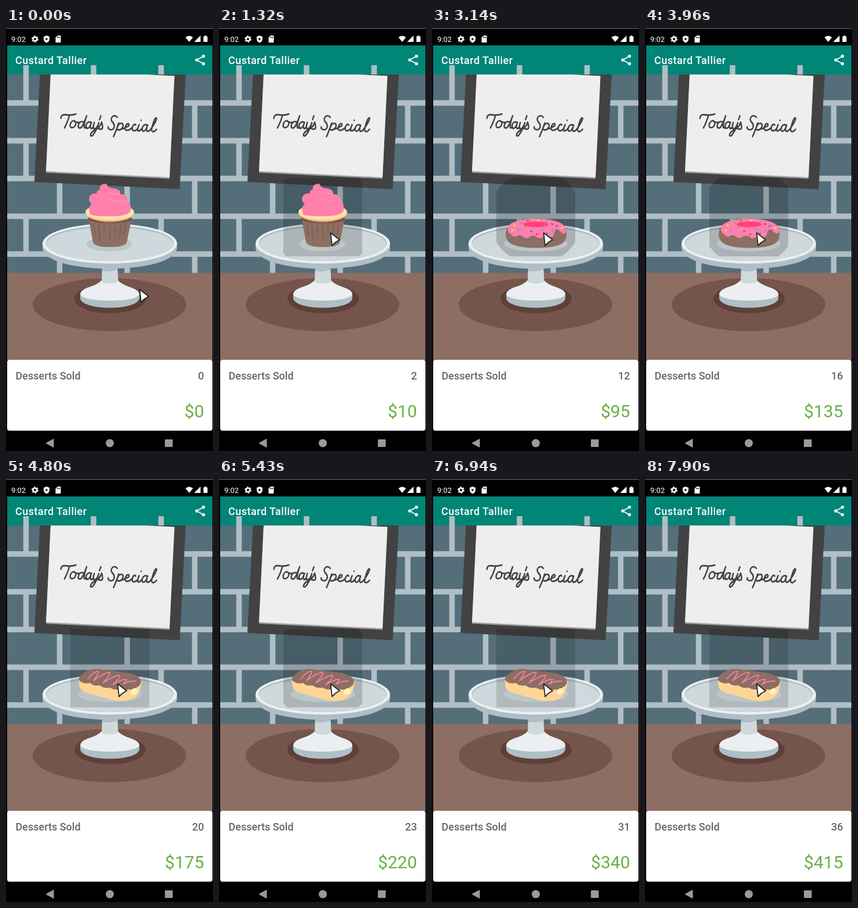
Recreate the animation shown at these times as an HTML page. Size 357 by 728 pixels, loop 8000 ms.

```html
<!DOCTYPE html>
<html lang="en">
<head>
<meta charset="utf-8">
<title>Dessert counter</title>
<style>
html, body { margin: 0; width: 100%; height: 100%; overflow: hidden; background: #000; }
svg { display: block; }
text { font-family: Roboto, sans-serif; }
.medium { font-size: 18px; font-weight: 500; }
.end { text-anchor: end; }
.line { fill: none; stroke-linecap: round; stroke-linejoin: round; }
.shade { fill: #bcc6c9; }
</style>
</head>
<body>
<svg width="357" height="728" viewBox="0 0 357 728">
  <rect width="357" height="728"/>
  <rect width="357" height="1" fill="#777"/>

  <!-- status bar -->
  <g fill="#fff">
    <text x="9" y="24" font-size="13">9:02</text>
    <circle cx="50" cy="19" r="3.3" fill="none" stroke="#fff" stroke-width="2.6"/>
    <circle cx="50" cy="19" r="5" fill="none" stroke="#fff" stroke-width="1.8" stroke-dasharray="2.6 2.64"/>
    <path d="M70 13l5 2v4q0 4-5 6.500q-5-2.500-5-6.500v-4z"/>
    <path d="M68.500 16.500v5l4-2.500z" fill="#000"/>
    <path d="M89 13h5.500v12h-9v-8.500z"/>
    <path d="M88.500 15v2.500m2-2.500v2.500m2-2.500v2.500" stroke="#000" stroke-width="1"/>
    <path d="M309.500 16q6.500-5 13 0l-6.500 8z"/>
    <path d="M335.500 13v11h-11z"/>
    <path d="M342.500 13h3v1.500h2v9.500h-7v-9.500h2z"/>
  </g>

  <!-- app bar -->
  <rect x="2" y="30" width="354" height="50" fill="#008577"/>
  <text class="medium" x="16" y="62" fill="#fff" letter-spacing=".5">Custard Tallier</text>
  <path d="M340.500 48.500L329 55l11.500 6.500" fill="none" stroke="#fff" stroke-width="1.700"/>
  <g fill="#fff">
    <circle cx="340.500" cy="48.500" r="2.700"/><circle cx="329" cy="55" r="2.700"/><circle cx="340.500" cy="61.500" r="2.700"/>
  </g>

  <!-- wall -->
  <rect x="2" y="80" width="354" height="342" fill="#546e7a"/>
  <path id="mortar" fill="none" stroke="#b0bec5" stroke-width="9.500"/>

  <!-- sign -->
  <path d="M58.500 80L49 265L299.500 277.500L310 80z" fill="#424242"/>
  <path d="M77 80L69 249L282 259.500L290.500 82.500L240 80z" fill="#9e9e9e"/>
  <path d="M77 80L69 246.500L282 257L290.500 82.500L240 80z" fill="#eee"/>
  <path class="line" role="img" aria-label="Today's Special" transform="translate(93 170.500) rotate(2.800) scale(.98 1.080)" stroke="#424242" stroke-width="2.500" d="
    M1-14Q1-21 10-20T27-22M16-20Q13-8 8 1
    M25-11C18-12 15 0 21 0C28 0 30-11 24-11Q28-8 33-9
    M41-10C33-13 29 0 35 0C39 0 42-8 46-20Q41-4 43-1Q45 0 47-2
    M54-10C46-13 43 0 48 0C52 0 54-6 55-10Q52-2 55 0Q57 0 59-3
    M60-10Q57 0 61 0Q65 0 68-10Q64 4 58 11Q53 13 55 8Q58 3 67-1
    M71-21l-2 6M68-3Q72-6 73-11Q77-1 73 0Q69 1 68-2
    M100-20C95-26 86-19 91-13C99-7 95 2 88 0Q84-1 85-4
    M103-11Q99 2 95 11M101-4C104-14 114-12 110-4Q106 2 101-1M109-2Q112-2 114-4
    M115-5Q122-6 121-10C117-14 111 0 118 0Q122 0 126-4
    M133-9C130-14 124-2 129 0Q133 1 137-4
    M139-10Q135 0 138 0Q141 0 144-4M142-17h.1
    M153-10C145-13 142 0 147 0C151 0 153-6 154-10Q151-2 154 0Q157 0 160-4
    Q170-18 169-22Q166-24 162-7Q160 1 165 0Q168-1 170-4"/>

  <!-- table and cake stand -->
  <rect x="2" y="421.500" width="354" height="150" fill="#8d6e63"/>
  <ellipse cx="178.500" cy="476" rx="132.500" ry="45.500" fill="#75544b"/>
  <ellipse cx="179.500" cy="466" rx="61.500" ry="25" fill="#5d4037"/>
  <path d="M128 458V465C130 487 228 487 230 465V458z" fill="#b0bec5"/>
  <path d="M165 434Q160 441 140 447Q128 452 128 458C130 473 228 473 230 458Q229 451 217 447Q198 441 193 434z" fill="#eceff1"/>
  <path d="M166 405L165 437Q179 443 193.500 437L192 405z" fill="#cfd8dc"/>
  <path d="M166 405V418Q180 421 192 416V405z" fill="#b0bec5"/>
  <path d="M63 371V379C68 426 290 426 295 379V371z" fill="#b0bec5"/>
  <ellipse cx="179" cy="371" rx="116" ry="34.500" fill="#eceff1"/>
  <ellipse cx="179" cy="370.500" rx="110.500" ry="30.500" fill="#b0bec5"/>
  <ellipse cx="179" cy="372" rx="109.500" ry="29" fill="#cfd8dc"/>

  <svg x="111" y="258" width="136" height="135">
    <circle id="ripple" cx="68" cy="67.500"/>
  </svg>

  <g class="dessert">
    <ellipse class="shade" cx="178" cy="372" rx="39.500" ry="12.500"/>
    <path d="M142 326L150 368Q152 377 179 377T208.500 368L217 326z" fill="#8d6e63"/>
    <path d="M142 326Q179 345 217 326L216 332Q179 341 143 332z" fill="#795548"/>
    <path class="line" stroke="#795548" stroke-width="1.200" d="M151 337l3 20M160 338l2 27M169 340v15M179 339v26M188 340v17M198 338l-2 25M207 336l-4 21"/>
    <ellipse cx="179" cy="318.500" rx="42" ry="14.500" fill="#ffcc80"/>
    <ellipse cx="179" cy="316.500" rx="42" ry="13" fill="#ffe0b2"/>
    <path d="M145 321C142 312 144 304 148 303C140 298 142 283 156 285C157 280 159 278 162 278Q160 268 173 268Q176 276 187 276Q198 278 197 286Q211 286 210 298Q216 301 215 313Q214 324 180 324Q150 324 145 321z" fill="#ff80ab"/>
    <path class="line" stroke="#f2a5bd" stroke-width="1" d="M173 282Q186 287 197 286M176 294Q196 300 210 298"/>
  </g>

  <g class="dessert">
    <ellipse class="shade" cx="179" cy="371" rx="54.500" ry="13.500"/>
    <path d="M131 342C124 353 127 366 136 371C150 381 210 381 224 371C233 366 234 351 229 342z" fill="#8d6e63"/>
    <path d="M131 344C133 323 225 323 230 344Q233 353 227 354Q222 352 218 347Q213 345 211 352Q209 362 203 360Q198 356 193 359Q185 365 180 359Q172 355 168 360Q162 364 157 359Q151 354 147 358Q139 361 136 354Q130 352 131 344z" fill="#ff80ab"/>
    <ellipse cx="179.500" cy="338" rx="21.500" ry="5" fill="#ff4081"/>
    <g id="sprinkles" class="line" stroke-width="1.900"></g>
  </g>

  <g class="dessert">
    <ellipse class="shade" cx="179" cy="370.500" rx="56" ry="13.500"/>
    <path d="M126 345Q125 357 129 362Q135 368 150 371L186 381Q207 384 219 378Q233 371 234 347z" fill="#ffd595"/>
    <path d="M126 346Q125 339 137 332Q149 325 166 328L213 334Q231 339 233 348Q232 356 226 358Q220 364 211 362Q204 366 196 362Q187 364 179 359Q169 361 161 355Q151 357 145 351Q133 354 126 346z" fill="#8d6e63"/>
    <path class="line" stroke="#ff80ab" stroke-width="1.700" d="M141 344Q152 331 159 331Q162 332 151 347Q172 332 179 333Q182 335 167 351Q189 337 196 338Q198 341 184 354Q203 343 208 345Q206 349 202 353Q212 347 224 348"/>
    <ellipse cx="221" cy="365.500" rx="6.500" ry="5" transform="rotate(-30 221 365.500)" fill="#fff3b8"/>
  </g>

  <!-- totals -->
  <rect x="2" y="571" width="354" height="122" rx="4" fill="#fff"/>
  <text class="medium" x="16.500" y="604.500" fill="#666">Desserts Sold</text>
  <text class="medium end" id="sold" x="341.500" y="604.500" fill="#666"/>
  <text class="end" id="money" x="341.500" y="670" font-size="30" fill="#66b245"/>

  <!-- navigation -->
  <g fill="#9a9a9a">
    <path d="M69 714.500L82 707.500V721.500z" stroke="#9a9a9a" stroke-linejoin="round"/>
    <circle cx="179" cy="714.500" r="7"/>
    <rect x="274" y="708" width="13.500" height="13" rx="1"/>
  </g>

  <path id="cursor" d="M0 0L2.500 22L8 16.500L15.500 12z" fill="#fff" stroke="#222" stroke-width="1.800" stroke-linejoin="round"/>
</svg>

<script>
const LOOP = 8000;
const $ = id => document.getElementById(id);
const desserts = document.querySelectorAll('.dessert');

// Screen refreshes come in bursts of eight: [first, last] in ms.
const bursts = [[150, 1170], [1320, 2270], [2420, 3440], [3560, 4500], [4650, 5580], [5700, 6670], [6790, 7750], [7900, 8950]];
// Taps made by a given time; the fraction is the progress of the current ripple.
const taps = [[0, 0], [850, 0], [1320, 2.5], [2270, 7.8], [3960, 16.3], [4800, 20.8], [6110, 27.6], [7900, 36.8], [8000, 36.9]];

// Brick courses, every second one shifted by half a brick.
let joints = '';
for (let row = 0; row < 6; row++) {
  const bottom = 129 + 65 * row;
  joints += `M2 ${bottom}H356`;
  for (let x = row % 2 ? 92.5 : 34.5; x < 356; x += 116.5) joints += `M${x} ${bottom - 65}V${bottom}`;
}
$('mortar').setAttribute('d', joints);

const colors = ['#ffeb3b', '#29b6f6', '#66bb6a', '#e53935', '#7e57c2'];
const spots = [[141, 340], [148, 348], [153, 335], [164, 332], [170, 350], [182, 331], [190, 347], [196, 333], [206, 337], [214, 341], [223, 344], [207, 348], [159, 343], [180, 355], [197, 353], [138, 349]];
$('sprinkles').innerHTML = spots.map(([x, y], i) =>
  `<path d="M${x} ${y}l2.500 ${i % 3 - 1}" stroke="${colors[i % 5]}"/>`).join('');

function refreshTime(t) {
  const burst = bursts.findLast(b => b[0] <= t);
  if (!burst) return 0;
  const step = (burst[1] - burst[0]) / 7;
  return burst[0] + step * Math.min(7, Math.floor((t - burst[0] + 10) / step));
}

function tapCount(t) {
  const i = Math.max(1, taps.findIndex(k => k[0] >= t));
  const [t0, n0] = taps[i - 1], [t1, n1] = taps[i];
  return n0 + (n1 - n0) * (t - t0) / (t1 - t0);
}

function draw(now) {
  const t = refreshTime(now % LOOP);
  const count = tapCount(t), sold = Math.floor(count + 1e-6), phase = count - sold;
  const kind = sold < 5 ? 0 : sold < 20 ? 1 : 2;
  const revenue = 5 * Math.min(sold, 5) + 10 * Math.min(Math.max(sold - 5, 0), 15) + 15 * Math.max(sold - 20, 0);

  desserts.forEach((d, i) => d.style.display = i === kind ? '' : 'none');
  $('sold').textContent = sold;
  $('money').textContent = '$' + revenue;
  $('ripple').setAttribute('r', 72 + 40 * phase);
  $('ripple').setAttribute('opacity', sold ? 0.2 - 0.07 * phase : 0);

  const p = Math.min(1, Math.max(0, (t - 100) / 750));
  const ease = p * p * (3 - 2 * p);
  $('cursor').setAttribute('transform', `translate(${230.5 - 38 * ease} ${450 - 97.5 * ease})`);
  requestAnimationFrame(draw);
}
requestAnimationFrame(draw);
</script>
</body>
</html>
```
